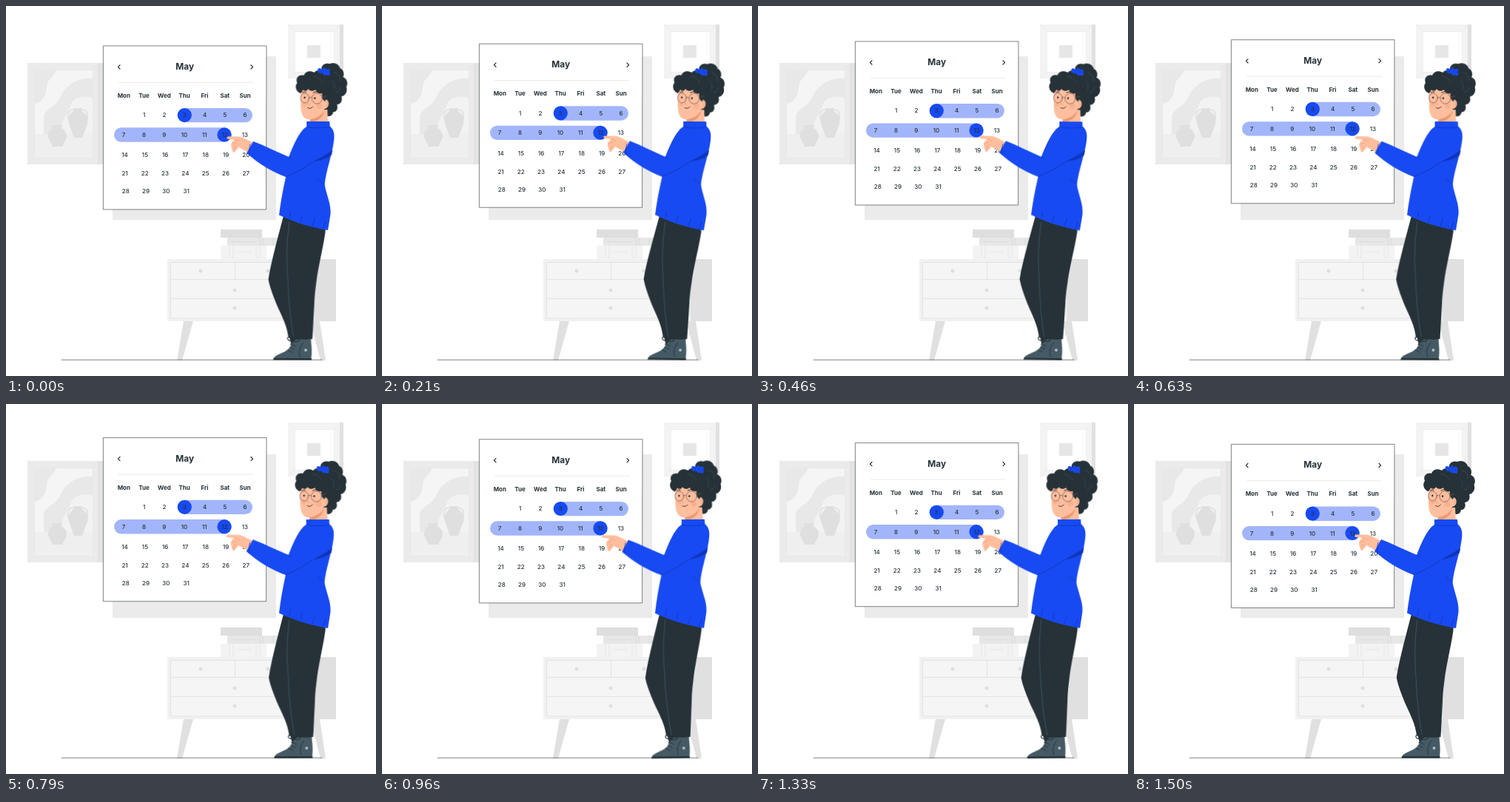
Animation of 500x500 px, one loop 1540 ms. Source, as an HTML page:

```html
<!DOCTYPE html>
<html lang="en">
<head>
<meta charset="utf-8">
<title>Calendar</title>
<style>
  html, body { margin: 0; width: 100%; height: 100%; overflow: hidden; background: #fff; }
  svg { display: block; width: 100vw; height: 100vh; }
  text { font: 500 8px Inter, "Open Sans", sans-serif; fill: #263238; text-anchor: middle; }
  .head { font-weight: 700; }
  .month { font-size: 11.8px; font-weight: 700; }
  .line { fill: none; stroke-linecap: round; stroke-linejoin: round; }

  #calendar { animation: slide 770ms linear -55ms infinite alternate; }
  .sway { animation: sway 770ms cubic-bezier(.37, 0, .63, 1) -425ms infinite alternate; }
  #legs { --a: .93deg; transform-origin: 405px 288px; }
  #upper { --a: .62deg; transform-origin: 405px 290px; }
  #face { --a: .75deg; transform-origin: 419px 150px; }
  @keyframes slide { from { transform: translateY(.5px); } to { transform: translateY(-9.5px); } }
  @keyframes sway {
    from { transform: rotate(calc(-1 * var(--a))); }
    to { transform: rotate(var(--a)); }
  }
</style>
</head>
<body>
<svg viewBox="0 0 500 500">
  <g id="room">
    <!-- left picture -->
    <path fill="#e3e3e3" d="M123 77h14v137h-14z"/>
    <path fill="#ebebeb" d="M29 77h95v137H29z"/>
    <path class="line" stroke="#e3e3e3" stroke-width=".6" d="M29 77l9.500 9.500M124 77l-6.500 9.500M29 214l9.500-8.500M124 214l-6.500-8.500"/>
    <path fill="#f5f5f5" stroke="#e2e2e2" stroke-width=".6" d="M38.500 86.500h79v119h-79z"/>
    <path fill="#e8e8e8" d="M39 87H67C65 97 55 99 55 109C55 121 47 131 39 132Z"/>
    <path fill="#e8e8e8" d="M51 152C51 138 66 138 73 124C80 108 96 96 117 98V173H51Z"/>
    <path fill="#f2f2f2" d="M76 173C71 154 85 145 87 135C91 122 107 121 117 124V173Z"/>
    <path fill="#efefef" d="M39 173h78v32H39z"/>
    <path fill="#dfdfdf" d="M91 138h12l-1 4c7 4 10 9 8 17l-7 19H92l-7-19c-2-8 1-13 7-17z"/>
    <path class="line" stroke="#dfdfdf" stroke-width="1.600" d="M92 141c-6-2-9 2-8 12M102 141c6-2 9 2 8 12"/>
    <path fill="#dfdfdf" d="M62 161h14l-1 4c5 3 8 8 7 13l-6 12H63l-6-12c-1-5 1-10 6-13z"/>
    <!-- right picture -->
    <path fill="#e0e0e0" d="M450 25h6v73h-6z"/>
    <path fill="#f3f3f3" d="M381 25h70v73h-70z"/>
    <path class="line" stroke="#e6e6e6" stroke-width=".6" d="M381 25l9.500 9.500M451 25l-7.500 9.500M381 98l9.500-8.500M451 98l-7.500-8.500"/>
    <path fill="#fff" stroke="#e6e6e6" stroke-width=".6" d="M390.500 34.500h53v55h-53z"/>
    <path fill="#e6e6e6" d="M407 53h18v17h-18z"/>
    <!-- books -->
    <path fill="#dedede" d="M290 302h56v11h-56z"/>
    <path fill="#e7e7e7" d="M299 313h71v11h-71z"/>
    <path class="line" stroke="#d9d9d9" stroke-width=".8" d="M304 318.500h34M343 314v9M347 314v9M361 314v9"/>
    <path fill="#f3f3f3" d="M290 324h62v18h-62z"/>
    <path class="line" stroke="#e3e3e3" stroke-width=".8" d="M302 324v17M307 324v17M338 324v17M343 324v17M313 332h18"/>
    <!-- dresser -->
    <path fill="#e0e0e0" d="M240 426h13l-15 53h-7zM411 426h13l8 53h-7zM416 342h30v84h-30z"/>
    <path fill="#f1f1f1" d="M218 342h199v84H218z"/>
    <path fill="#f5f5f5" stroke="#dfdfdf" stroke-width=".8" d="M222.500 346.500h188v75.500h-188zM222.500 369.500h188M222.500 395.500h188M309.500 346.500v23"/>
    <g fill="#dfdfdf">
      <circle cx="263" cy="358" r="2.500"/><circle cx="354" cy="358" r="2.500"/>
      <circle cx="309" cy="384" r="2.500"/><circle cx="309" cy="408" r="2.500"/>
    </g>
    <path fill="#ebebeb" d="M144 68h221v221H144z"/>
    <path class="line" stroke="#263238" stroke-width=".6" d="M75 478.200H427"/>
  </g>

  <g id="calendar">
    <path fill="#fff" stroke="#263238" stroke-width=".6" d="M131.400 54.100H352L351.600 275.200H131.400Z"/>
    <path stroke="#e3e3e3" stroke-width=".8" d="M152 103.500H334"/>
    <path class="line" stroke="#263238" stroke-width="1.200" d="M154 80l-2.600 2.600 2.600 2.600M331 80l2.600 2.600-2.600 2.600"/>
    <rect x="232" y="138.200" width="101" height="19.400" rx="9.700" fill="#a2b5fa"/>
    <rect x="146" y="164.600" width="159" height="19.400" rx="9.700" fill="#a2b5fa"/>
    <g fill="#174af2"><circle cx="241.300" cy="147.800" r="9.600"/><circle cx="295" cy="174.200" r="9.600"/></g>
    <text class="month" x="241.700" y="86.100">May</text>
  </g>

  <g id="legs" class="sway">
    <path fill="#263238" d="M383 446H413L412 458H386Z"/>
    <path fill="#455a64" d="M388 452C396 449 404 452 412 450C414 460 414 469 413 477H362C363 472 372 470 379 466C385 462 386 458 388 452Z"/>
    <path fill="#263238" d="M362 476H413.500V478.600H361.500Z"/>
    <path class="line" stroke="#263238" stroke-width=".9" d="M381 465l6 3M384 461l6 3M386 457l6 3M398 474C395 466 398 460 402 455"/>
    <circle cx="405.500" cy="465" r="1.900" fill="#b0bec5"/>
    <path class="line" stroke="#263238" stroke-width="1.200" d="M389 453c-4-7-9-6-8-3 1 2 4 3 8 3 4-5 9-5 8-2s-5 3-8 2l-4 5"/>
    <path fill="#263238" d="M376 280L432 292L431.500 306C428 330 422 352 419.500 374C418 385 417.300 393 417 402L414.500 450L382 448C380 432 374 421 368 408C362 394 356 378 354.800 369.500C358 348 366 318 376 280Z"/>
    <path class="line" stroke="#455a64" stroke-width=".8" d="M383 292C379 320 379 342 381 368C382 395 385 425 389 447"/>
  </g>

  <g id="upper" class="sway">
    <g id="face" class="sway">
      <path fill="#263238" d="M399 118C392 117 389 109 393 104C390 97 396 92 402 94C404 88 411 87 416 90C419 86 424 87 426 88C424 80 431 76 437 78C443 75 450 79 451 84C456 86 457 92 455 96C461 98 462 105 459.500 109C462 116 457 122 453 122C455 129 451 133 447 133C449 139 446 143 442 143C441 149 436 150 433 148C429 152 424 149 424 145Z"/>
      <path fill="#ffbe9d" d="M410 140H434L435 161H410Z"/>
      <path fill="#eb996e" d="M411 152C419 152 426 148 430 141C429 149 423 156 411 157Z"/>
      <path fill="#ffbe9d" d="M399 108C397 116 398 126 398 135C398 144 401 152 407 153C416 154 425 149 430 139C437 138 438 127 431 126L428 106C419 101 406 102 399 108Z"/>
      <path fill="#263238" d="M396 117C391 114 391 107 395 104C398 97 406 96 410 98C416 93 428 95 433 102C440 106 440 118 437 126C434 122 432 124 431 129C427 127 426 121 427 118C421 119 419 116 418 113C414 116 410 115 408 112C406 116 402 115 401 113C400 116 398 119 396 117Z"/>
      <path class="line" stroke="#3f5058" stroke-width=".7" d="M443 90c7 1 9 6 8 11M440 101c4 2 5 7 3 11M452 110c0 4-3 6-6 6M415 95c6 0 10 4 12 8"/>
      <path fill="#174af2" d="M420.500 86C421.500 82.500 425 84 427 86C428 82 432 83 432 86C436 83 438 86 437 90C438 94 435 95 433 93C431 94 428 93 427 90.500C424 92 420.500 90 420.500 86Z"/>
      <path class="line" stroke="#0f35ba" stroke-width=".7" d="M424 86l2 4M430 86l1 4M435 88l-1 3"/>
      <g fill="#eb996e" opacity=".3"><circle cx="403" cy="133" r="3"/><circle cx="423" cy="135" r="4"/></g>
      <g fill="#263238"><ellipse cx="403.300" cy="123.800" rx="1.100" ry="1.500"/><ellipse cx="417" cy="124.500" rx="1.100" ry="1.500"/></g>
      <path class="line" stroke="#263238" stroke-width="1" d="M400.500 117q2-2 4.500-.8M415 117q3-2.500 7-.5"/>
      <path class="line" stroke="#263238" stroke-width=".9" d="M407.500 137.500q4 2.500 7-1.500"/>
      <path class="line" stroke="#eb996e" stroke-width=".8" d="M410 124q-3 5-3 8 1 1.500 3 1M433 129q2 2-.5 6"/>
      <g class="line" stroke="#6d5953" stroke-width=".7">
        <ellipse cx="403.500" cy="124.500" rx="5.800" ry="6.500"/><ellipse cx="420" cy="125" rx="7" ry="7.200"/>
        <path d="M409.300 123.500q2-1.500 3.800.5M427 123.500l5.500-2"/>
      </g>
    </g>
    <path fill="#ffbe9d" d="M334 185L321 178.500C316 176 310 176.500 300 176.600C297.500 177 298 179.800 300.500 180L309 181C305 183 303 187 304.500 191L306 196.500C307 199 310 198.500 309.500 195.500C313 195 313 192 314 191L327 198Z"/>
    <path class="line" stroke="#eb996e" stroke-width=".7" d="M309 181c3 0 5 1 7 3M306 187c2-2 4-2 5-1M309 195c-1-3 0-5 2-6"/>
    <path fill="#174af2" d="M406 156H437L437.500 162.500C443 167 444.500 173 442.500 185C440 203 432.500 222 430.500 241C433 256 439.500 267 438.500 281L435 303C412 299 391 293 369 282.500C371 266 374 249 378 231C359 224 341 213 325 199L334 183C350 189 365 197 382 204C387 191 393 176 402 166L406 163Z"/>
    <path fill="#0f35ba" d="M441 194.500C431 202 424 205 415 210.500C425 209 434 206 440 201Z"/>
    <g class="line" stroke="#0f35ba" stroke-width=".8">
      <path d="M407 163.500Q421 166 437 163.500M415 210.500C402 219 390 227 378 230.500M382 204L386 207M430.500 241L421 233M330 187Q328 192 329 201"/>
      <path d="M383 286l1.500-8M398 292l2-9M414 297l3-9M429 300l3-9"/>
    </g>
  </g>
</svg>
<script>
  const calendar = document.getElementById("calendar");

  function label(text, x, y, cls = "") {
    const el = document.createElementNS("http://www.w3.org/2000/svg", "text");
    el.setAttribute("x", x);
    el.setAttribute("y", y + 2.9);
    el.setAttribute("class", cls);
    el.textContent = text;
    calendar.append(el);
  }

  const step = 27.3;
  "Mon Tue Wed Thu Fri Sat Sun".split(" ")
    .forEach((day, i) => label(day, 159.3 + i * step, 121.2, "head"));

  const rows = [
    { y: 147.8, x: 159.3 }, { y: 174.5, x: 159.1 }, { y: 201.7, x: 160.6 },
    { y: 226.6, x: 160.5 }, { y: 250.6, x: 161.8 }
  ];
  for (let day = 1; day <= 31; day++) {
    const row = rows[Math.floor(day / 7)];
    label(day, row.x + (day % 7) * step, row.y);
  }
</script>
</body>
</html>
```
